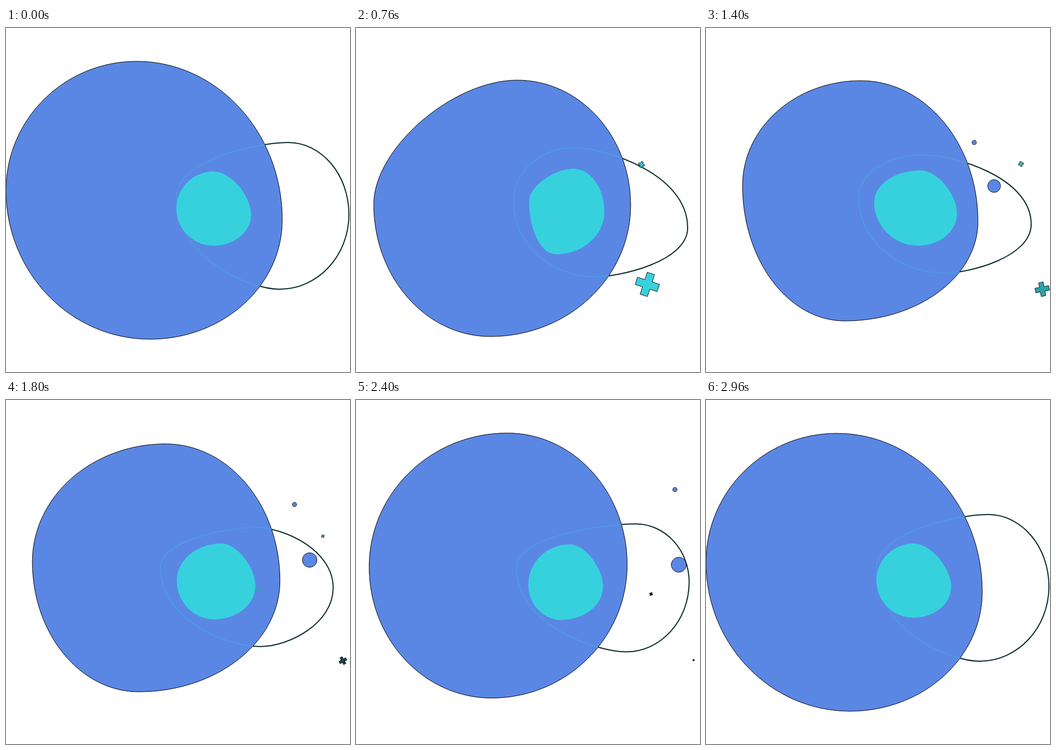
An HTML page with a canvas for the animation above (3000 ms loop, 640x640 px).

```html
<!DOCTYPE html>
<html lang="en">
<head>
<meta charset="utf-8">
<title>Blobs</title>
<style>
html, body { margin: 0; width: 100%; height: 100%; overflow: hidden; background: #fff; }
canvas { display: block; }
</style>
</head>
<body>
<canvas id="stage" width="640" height="640"></canvas>
<script>
const g = document.getElementById('stage').getContext('2d');
const LOOP = 3000, STEP = 40, SPAN = 2960, ROUND = .5523;
const BLUE = '#5a87e4', TEAL = [55, 209, 222], INK = '#000', RING = '#06282c', GLOW = '#4c9fe1';

// Quarters run clockwise from the top right; each gets [horizontal, vertical] handle lengths.
const soften = flat => i => i === flat ? [.45, .45] : [ROUND, ROUND];
const pinch = left => i => {
  const q = i > 1 ? left : 1 - left;
  return [ROUND - .28 * q, ROUND + .13 * q];
};

// Pose: time, then x,y of the top, right, bottom and left extremes, then the quarter to flatten
const big = shape(soften, [
  [0, 243,62, 514,357, 268,579, 0,302],
  [400, 240,96, 515,325, 268,571, 11,335],
  [760, 300,97, 511,330, 250,574, 33,328, 3],
  [1400, 288,98, 506,360, 258,545, 68,293],
  [2160, 305,67, 513,315, 237,541, 32,308],
  [2640, 258,56, 496,298, 267,568, 17,313]
]);
const core = shape(soften, [
  [0, 386,267, 456,348, 386,405, 317,336, 0],
  [400, 383,261, 473,342, 407,427, 323,340, 2],
  [760, 405,262, 462,342, 372,421, 322,322, 3],
  [1400, 399,265, 467,345, 395,405, 313,324, 0],
  [2160, 402,269, 461,347, 380,411, 322,347, 0]
]);
// Here the last value says how far the pinch sits on the left side
const ring = shape(pinch, [
  [0, 525,213, 638,347, 509,486, 317,315, 1],
  [760, 405,223, 617,372, 445,463, 293,322, 0],
  [1400, 405,236, 605,365, 445,456, 284,315, 0],
  [2160, 518,238, 612,335, 500,461, 290,308, 1]
]);

// Key: time, x, y, size; a cross darkens to black by its fade time
const particles = [
  { fade: 2100, keys: [[200,387,336,20], [400,428,401,44], [760,542,477,43], [1120,621,485,39], [1400,625.5,486,26], [2160,628,484,4], [2800,628,484,2]] },
  { fade: 2750, keys: [[400,440,290,10], [760,531,254,11], [1400,586,253,9], [2400,595,254,0]] },
  { fade: 2520, keys: [[1400,400,345,12], [2160,534,361,6], [2640,564,361,6], [2880,570,361,0]] },
  { keys: [[900,440,240,8], [1400,499,213,8], [2640,616,155.5,8], [2920,632,146,0]] },
  { keys: [[900,450,290,20], [1400,536,294,24], [2160,591,301,30], [2640,610,312,26], [2920,617,318,0]] }
];

// Turns poses into keys of curve points and closes the loop
function shape(rule, poses) {
  const keys = poses.map(([t, ...p]) => {
    const reach = rule(p[8]), key = [t];
    for (let i = 0; i < 4; i++) {
      const j = (i + 1) % 4, [h, v] = reach(i);
      const x = p[2 * i], y = p[2 * i + 1], dx = p[2 * j] - x, dy = p[2 * j + 1] - y;
      key.push(x, y);
      if (i % 2) key.push(x, y + dy * v, x + dx * (1 - h), y + dy);
      else key.push(x + dx * h, y, x + dx, y + dy * (1 - v));
    }
    return key;
  });
  return [...keys, [SPAN, ...keys[0].slice(1)]];
}

function track(keys, t) {
  const k = keys.findIndex(q => q[0] > t);
  if (k < 1) return null;
  const a = keys[k - 1], b = keys[k], u = (t - a[0]) / (b[0] - a[0]);
  return a.map((v, i) => v + (b[i] - v) * u).slice(1);
}

function outline(keys, t) {
  const c = track(keys, t), path = new Path2D();
  path.moveTo(c[0], c[1]);
  for (let i = 2; i < 24; i += 6) {
    path.bezierCurveTo(...[0, 1, 2, 3, 4, 5].map(n => c[(i + n) % 24]));
  }
  path.closePath();
  return path;
}

function paint(path, fill, line, width) {
  if (fill) { g.fillStyle = fill; g.fill(path); }
  if (line) { g.strokeStyle = line; g.lineWidth = width; g.stroke(path); }
}

function cross(size) {
  const path = new Path2D(), r = size / 2, w = size / 6;
  for (let i = 0; i < 4; i++) {
    const c = Math.cos(i * Math.PI / 2), s = Math.sin(i * Math.PI / 2);
    for (const [x, y] of [[-w, -r], [w, -r], [w, -w]]) path.lineTo(x * c - y * s, x * s + y * c);
  }
  path.closePath();
  return path;
}

function disc(size) {
  const path = new Path2D();
  path.arc(0, 0, size / 2, 0, 7);
  return path;
}

function drawParticles(t, line) {
  for (const { fade, keys } of particles) {
    const p = track(keys, t);
    if (!p) continue;
    const [x, y, size] = p;
    const light = Math.max(0, Math.min(1, (fade - t) / 900));
    g.save();
    g.translate(x, y);
    g.rotate(.045 * (1160 - t) * Math.PI / 180);
    if (fade) paint(cross(size), `rgb(${TEAL.map(v => v * light)})`, line, .8);
    else paint(disc(size), BLUE, line, .8);
    g.restore();
  }
}

function draw(t) {
  const body = outline(big, t), loop = outline(ring, t);
  g.fillStyle = '#fff';
  g.fillRect(0, 0, 640, 640);
  paint(loop, null, RING, 2);
  drawParticles(t, INK);
  g.save();
  g.beginPath();
  g.rect(0, 61, 640, 579);
  g.clip();
  paint(body, BLUE, INK, 1);
  g.clip(body);
  paint(loop, null, GLOW, 1.5);
  drawParticles(t);
  g.restore();
  paint(outline(core, t), `rgb(${TEAL})`);
}

const start = performance.now();
function tick() {
  const t = (performance.now() - start) % LOOP;
  draw(Math.floor(t / STEP) * STEP % SPAN);
  requestAnimationFrame(tick);
}
tick();
</script>
</body>
</html>
```
